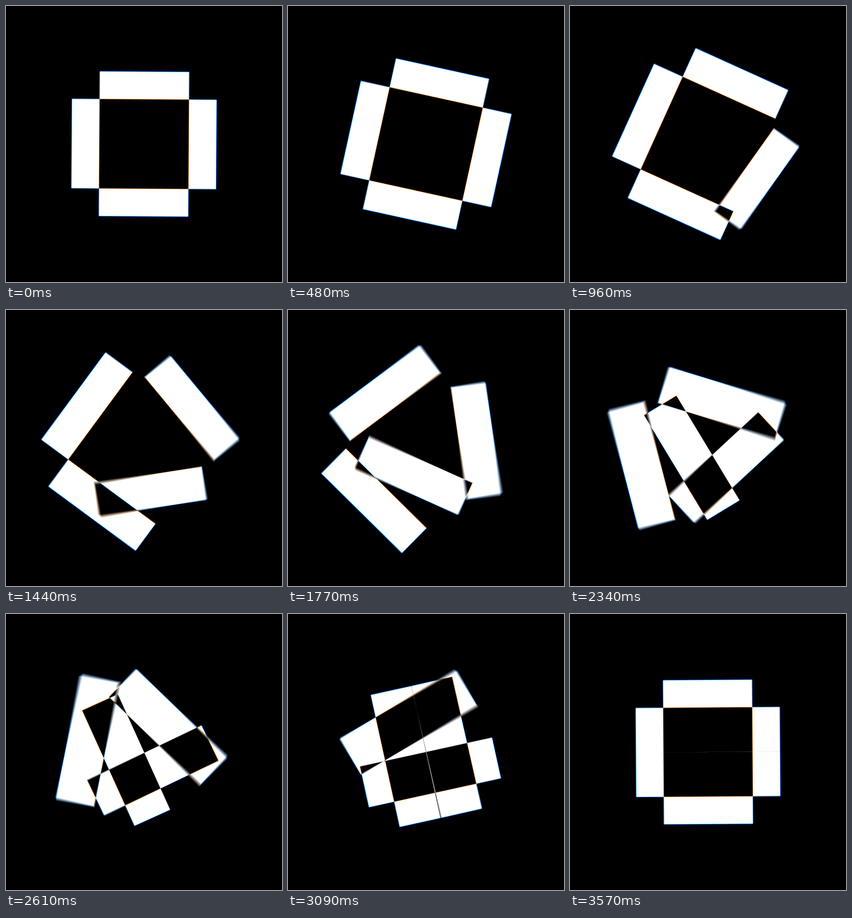
An HTML page with a canvas for the animation above (3600 ms loop, 500x500 px).

```html
<!DOCTYPE html>
<html lang="en">
<head>
<meta charset="utf-8">
<title>Golden bars</title>
<style>
  html, body { margin: 0; width: 100%; height: 100%; overflow: hidden; background: #000; }
  canvas { display: block; width: 500px; height: 500px; }
</style>
</head>
<body>
<canvas id="stage" width="500" height="500"></canvas>
<script>
const ctx = document.getElementById('stage').getContext('2d');

const LOOP = 3600, STEP = 30, CENTER = 250;
const PHI = (1 + Math.sqrt(5)) / 2;
const WIDE = 50, LONG = 100 * PHI;
const SAMPLES = 15, LEVEL = 255 / SAMPLES;
const FRINGE = 0.004;

// Each colour channel is drawn at a slightly different zoom.
const CHANNELS = [
  { color: `rgb(${LEVEL},0,0)`, zoom: 1 - FRINGE },
  { color: `rgb(0,${LEVEL},0)`, zoom: 1 },
  { color: `rgb(0,0,${LEVEL})`, zoom: 1 + FRINGE }
];

const clamp = x => Math.min(1, Math.max(0, x));
const ease = x => x * x * (3 - 2 * x);

// Bars start around a square, then swing a quarter turn inwards one by one.
function addBar(path, i, p, zoom) {
  const e = ease(clamp(2.1 * p - 0.35 - 0.25 * i));
  const angle = (p + e - i) * Math.PI / 2;
  const near = (1 - e) * LONG / 2, far = near + WIDE, half = LONG / 2;
  const c = Math.cos(angle) * zoom, s = Math.sin(angle) * zoom;
  const corners = [[near, -half], [far, -half], [far, half], [near, half]];
  corners.forEach(([x, y], k) => {
    const px = CENTER + x * c - y * s, py = CENTER + x * s + y * c;
    if (k) path.lineTo(px, py); else path.moveTo(px, py);
  });
  path.closePath();
}

function drawBars(p, channel) {
  const path = new Path2D();
  const zoom = Math.pow(PHI, p) * channel.zoom;
  for (let i = 0; i < 4; i++) addBar(path, i, p, zoom);
  ctx.fillStyle = channel.color;
  ctx.fill(path, 'evenodd');
}

// Averages several moments across one step for motion blur.
function draw(ms) {
  const start = Math.floor((ms % LOOP) / STEP) * STEP;
  ctx.globalCompositeOperation = 'source-over';
  ctx.fillStyle = '#000';
  ctx.fillRect(0, 0, 500, 500);
  ctx.globalCompositeOperation = 'lighter';
  for (let k = 0; k < SAMPLES; k++) {
    const p = (start + STEP * (k + 0.5) / SAMPLES) / LOOP;
    CHANNELS.forEach(channel => drawBars(p, channel));
  }
}

const begin = performance.now();
function tick() {
  draw(Math.max(0, performance.now() - begin));
  requestAnimationFrame(tick);
}
draw(0);
requestAnimationFrame(tick);
</script>
</body>
</html>
```
